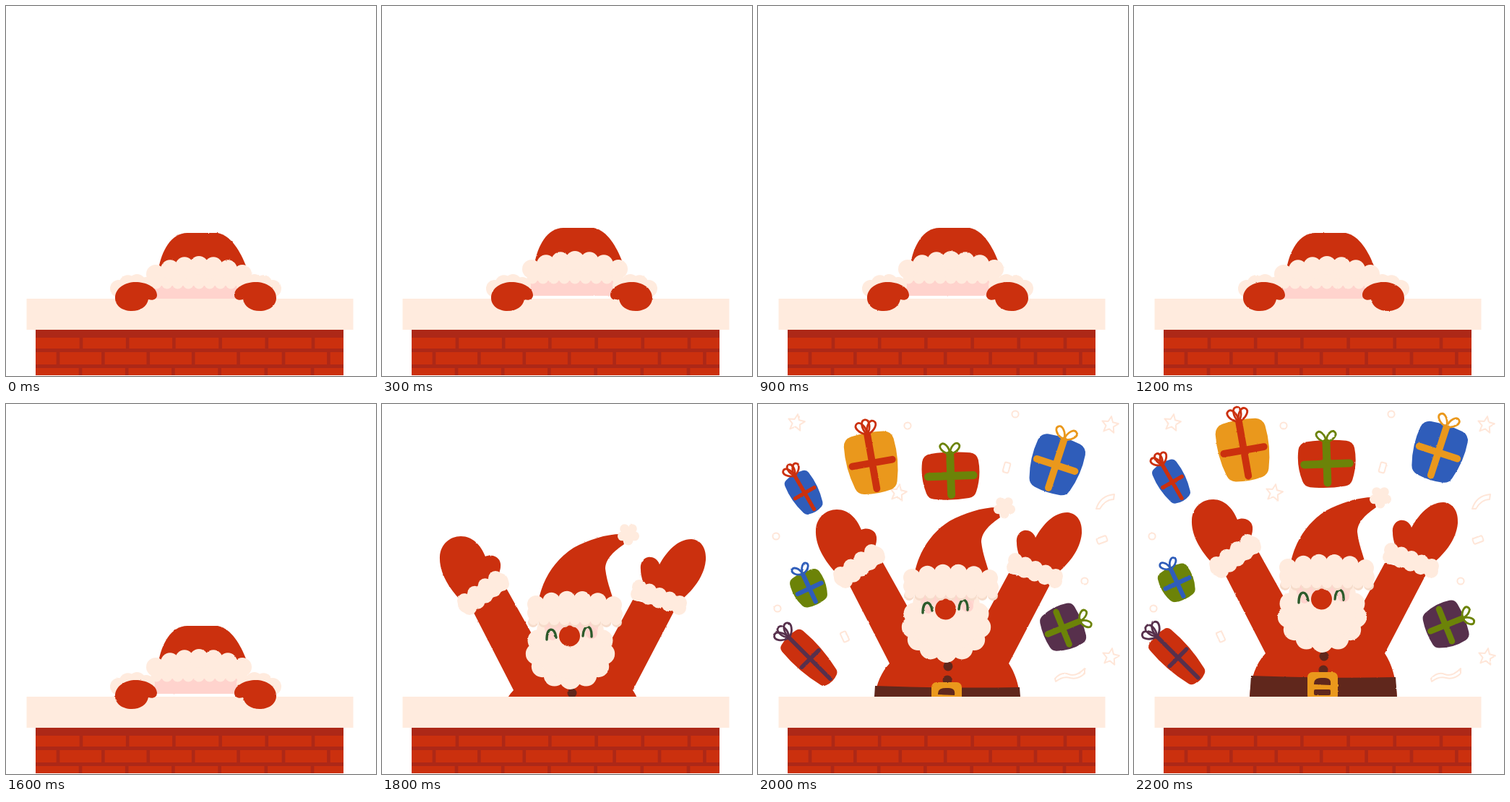
An HTML page that plays this animation: 512 px wide and 512 px high, repeating every 2.6 s.

```html
<!DOCTYPE html>
<html lang="en">
<head>
<meta charset="utf-8">
<title>Chimney surprise</title>
<style>
  html, body { margin: 0; width: 100%; height: 100%; overflow: hidden; background: #fff; }
  svg { display: block; width: 100vw; height: 100vh; }
</style>
</head>
<body>
<svg id="stage" viewBox="0 0 512 512"></svg>
<script>
const C = {
  red: '#cb300e', mortar: '#ad2817', cream: '#ffebde', shade: '#f6dccb', pink: '#ffd3cd',
  brown: '#60271c', orange: '#ea981c', blue: '#2f5dba', green: '#6c8308', plum: '#57304c',
  eye: '#2c5a2b', paper: '#ffe6d8'
};
const LOOP = 2600, RISE = 1800, HALF = 300;

const times = (n, f) => Array.from({ length: n }, (_, i) => f(i)).join('');
const path = (d, fill) => `<path d="${d}" fill="${fill}"/>`;
const line = (d, col, w) =>
  `<path d="${d}" fill="none" stroke="${col}" stroke-width="${w}" stroke-linecap="round" stroke-linejoin="round"/>`;
const rect = (x, y, w, h, fill, r = 0) =>
  `<rect x="${x}" y="${y}" width="${w}" height="${h}" rx="${r}" fill="${fill}"/>`;
const dot = (x, y, r, fill = C.cream) => `<circle cx="${x}" cy="${y}" r="${r}" fill="${fill}"/>`;
const group = (id, body) => `<g id="${id}">${body}</g>`;
const mirror = body => body + `<g transform="translate(525 0) scale(-1 1)">${body}</g>`;

// Fur: bumps along an arched line, or around an ellipse.
const fluff = (x0, y0, x1, y1, n, r, arch = 0, fill = C.cream) => times(n, i => {
  const u = i / (n - 1);
  return dot(x0 + (x1 - x0) * u, y0 + (y1 - y0) * u - arch * 4 * u * (1 - u), r, fill);
});
const ring = (x, y, rx, ry, n, r) => times(n, i => {
  const a = Math.PI * (2 * i / n + .5);
  return dot(x + rx * Math.cos(a), y + ry * Math.sin(a), r);
}) + `<ellipse cx="${x}" cy="${y}" rx="${rx}" ry="${ry}" fill="${C.cream}"/>`;

function chimney() {
  const course = (y, h, joint, gap) => {
    let s = rect(41, y, 426, h, C.red);
    for (let x = joint; x < 460; x += gap) s += rect(x - 2.3, y, 4.6, h, C.mortar);
    return s;
  };
  return rect(41, 447, 426, 64, C.mortar) + course(459, 15, 104, 64.2) +
    course(479, 17, 72, 62.4) + course(501, 10, 103, 64.2) + rect(28.5, 405, 452, 43, C.cream);
}

function peek() {
  return path('M211 364C215 340 228 314 251 314H293C312 318 324 339 333 362Z', C.red) +
    rect(205, 384, 115, 24, C.pink) + rect(206, 363, 124, 24, C.cream) +
    fluff(207, 371, 327, 371, 7, 13, 12) + fluff(208, 384, 326, 384, 9, 7.5);
}

const cuffs = () => mirror(fluff(156, 391, 194, 387, 4, 12, 6));
const mitts = () => mirror(path('M151 404C151 389 167 381 182 382C196 383 209 390 209 400' +
  'C209 406 203 408 197 406C195 416 186 422 174 422C160 422 151 414 151 404Z', C.red));

function face() {
  return ring(260.5, 290, 47, 39, 13, 15) +
    path('M224 248H299C300 263 298 272 288 274H240C229 274 223 263 224 248Z', 'url(#blush)') +
    dot(236, 270, 6, C.pink) + dot(290, 266, 8, C.pink) +
    line('M228 275C228 257 239 257 241 272M278 270C279 253 291 253 290 271', C.eye, 3.4) +
    dot(259.5, 270, 14.5, C.red);
}

function brim() {
  return fluff(209, 251, 325, 251, 9, 7, 0, C.shade) + rect(208, 220, 118, 30, C.cream) +
    fluff(213, 226, 320, 227, 6, 12, 7) + fluff(213, 238, 321, 240, 2, 12) +
    fluff(210, 248, 324, 248, 9, 7);
}

function body() {
  return path('M126 236L182 345C168 360 161 380 160 408V470H364V408C363 380 357 360 347 345' +
      'L405 234L347 220L312 285L210 272L172 204Z', C.red) +
    path('M112 224C90 202 79 180 80 160C81 143 94 132 109 132C126 132 137 145 143 160' +
      'C151 156 163 160 164 170C165 180 160 187 157 194Z', C.red) +
    path('M412 222C428 209 446 189 448 165C449 149 442 137 428 136C409 136 394 153 384 171' +
      'C381 162 373 160 368 161C360 163 357 171 358 178C358 187 361 194 364 205Z', C.red) +
    line('M117 226L163 195', C.cream, 24) + line('M357 208L410 226', C.cream, 20) +
    fluff(114, 221, 157, 190, 4, 10) + fluff(121, 231, 166, 198, 5, 10) +
    fluff(356, 202, 412, 224, 5, 10) + fluff(354, 212, 411, 231, 5, 10);
}

function belt() {
  return dot(263, 349, 6.5, C.brown) + dot(262, 368, 6.5, C.brown) +
    path('M162 376Q262 380 362 378L364 406V470H160V406Z', C.brown) +
    rect(240, 371, 42, 39, C.orange, 7) +
    path('M249 388C249 380 254 379 261 379C270 379 273 381 272 389Z', C.brown) +
    rect(249, 395, 23, 8, C.brown, 2);
}

function santa() {
  return body() + belt() +
    path('M216 224C222 190 240 164 265 148C285 137 310 129 331 129L335 143' +
      'C322 152 309 163 309 177C311 195 317 208 321 224Z', C.red) +
    ring(341, 129, 9, 9, 5, 6.5) + face() + brim();
}

const gifts = [
  { x: 152, y: 64, tilt: -10, w: 70, h: 82, fill: C.orange, rib: C.red, loops: 3 },
  { x: 53, y: 108, tilt: -30, w: 38, h: 57, fill: C.blue, rib: C.red, loops: 3 },
  { x: 267, y: 83, tilt: -2, w: 78, h: 63, fill: C.red, rib: C.green, loops: 2 },
  { x: 421, y: 67, tilt: 18, w: 69, h: 76, fill: C.blue, rib: C.orange, loops: 2 },
  { x: 60, y: 248, tilt: -25, w: 45, h: 46, fill: C.green, rib: C.blue, loops: 2 },
  { x: 431, y: 306, tilt: 68, w: 60, h: 53, fill: C.plum, rib: C.green, loops: 2 },
  { x: 61, y: 351, tilt: -45, w: 41, h: 84, fill: C.red, rib: C.plum, loops: 3 }
];

// A soft box, narrower at the foot, with crossed ribbon and a looped bow.
function gift({ w, h, fill, rib, loops }) {
  const k = Math.min(w, h) * .2, x = w / 2 - k, y = h / 2 - k, foot = x - h * .06;
  const rw = w * .14, end = w / 2 - rw * .7, size = 10 + h * .13, fan = loops > 2 ? 36 : 84;
  const loop = `M0 0C${-size * .36} ${-size * .45} ${-size * .3} ${-size} 0 ${-size}` +
    `C${size * .3} ${-size} ${size * .36} ${-size * .45} 0 0`;
  return `<path d="M${-x} ${-y}Q0 ${-y - 3} ${x} ${-y}Q${x + 3} 0 ${foot} ${y}Q0 ${y + 3} ${-foot} ${y}` +
    `Q${-x - 3} 0 ${-x} ${-y}Z" fill="${fill}" stroke="${fill}" stroke-width="${2 * k}" stroke-linejoin="round"/>` +
    line(`M0 ${2 - h / 2}V${h / 2 - rw / 2}M${-end} 0H${end}`, rib, rw) +
    times(loops, i => `<g transform="translate(0 ${1 - h / 2}) rotate(${fan * (i - (loops - 1) / 2)})">` +
      line(loop, rib, 2.8) + '</g>');
}

function star(x, y) {
  const pts = Array.from({ length: 10 }, (_, i) => {
    const a = i * Math.PI / 5 - 1.4, r = i % 2 ? 5.5 : 12;
    return `${x + r * Math.cos(a)} ${y + r * Math.sin(a)}`;
  });
  return `<path d="M${pts.join('L')}Z"/>`;
}

function confetti() {
  const stars = [[53, 26], [487, 29], [194, 123], [488, 350]];
  const beads = [[207, 30], [25, 183], [356, 14], [452, 245], [27, 283]];
  const slips = [[344, 88, 15], [120, 322, -25], [476, 188, 70]];
  return `<g fill="none" stroke="${C.paper}" stroke-width="2" stroke-linejoin="round">` +
    stars.map(p => star(...p)).join('') +
    beads.map(([x, y]) => `<circle cx="${x}" cy="${y}" r="4.6"/>`).join('') +
    slips.map(([x, y, a]) => `<rect x="-4" y="-7" width="8" height="14" rx="2"` +
      ` transform="translate(${x} ${y}) rotate(${a})"/>`).join('') +
    '<path d="M468 145C472 132 482 126 493 125L492 132C484 132 477 138 473 145Z"/>' +
    '<path d="M411 380Q420 370 430 374T452 366V373Q442 382 432 379T412 384Z"/></g>';
}

document.getElementById('stage').innerHTML =
  `<filter id="rough" filterUnits="userSpaceOnUse" x="0" y="0" width="512" height="512"
     color-interpolation-filters="sRGB">
     <feTurbulence id="grain" type="fractalNoise" baseFrequency=".25" numOctaves="2"/>
     <feDisplacementMap in="SourceGraphic" scale="1.8" xChannelSelector="R" yChannelSelector="G"/>
   </filter>
   <linearGradient id="blush" x2="0" y2="1">
     <stop offset=".3" stop-color="${C.pink}"/><stop offset="1" stop-color="${C.cream}"/>
   </linearGradient>
   <clipPath id="above"><rect width="512" height="406"/></clipPath>` +
  '<g filter="url(#rough)">' +
  group('party', confetti() + gifts.map(g => `<g class="gift">${gift(g)}</g>`).join('')) +
  '<g clip-path="url(#above)">' + group('santa', santa()) +
  group('hiding', group('peek', peek()) + cuffs()) + '</g></g>' +
  chimney() + `<g filter="url(#rough)">${group('mitts', mitts())}</g>`;

const el = id => document.getElementById(id);
const boxes = [...document.querySelectorAll('.gift')];
const show = (id, on) => el(id).setAttribute('display', on ? 'inline' : 'none');
const move = (node, x, y, a = 0) =>
  node.setAttribute('transform', `translate(${x} ${y}) rotate(${a})`);

function draw(step) {
  const t = step * 100, up = t >= RISE, beat = Math.floor(t / HALF);
  const u = Math.min(1, Math.max(0, (t - RISE) / 400));
  const drop = 51 * (1 - u) ** 1.87;
  show('santa', up);
  show('party', t > RISE);
  show('hiding', !up);
  show('mitts', !up);
  move(el('santa'), 0, drop);
  move(el('peek'), 0, beat % 2 ? -7 : 0);
  // Gifts burst outward from the chimney as he rises.
  const out = 1 - drop * .004;
  gifts.forEach(({ x, y, tilt }, i) =>
    move(boxes[i], 262 + (x - 262) * out, 380 + (y - 380) * out, tilt));
  // The outline wobble changes with each new drawing and then holds.
  const hold = up ? Math.min(step, 22) : 2 * beat + (beat > 0 && t % HALF >= 100);
  el('grain').setAttribute('seed', hold + 1);
}

const start = performance.now();
let last = -1;
function tick() {
  const step = Math.floor((performance.now() - start) % LOOP / 100);
  if (step !== last) draw(last = step);
  requestAnimationFrame(tick);
}
tick();
</script>
</body>
</html>
```
